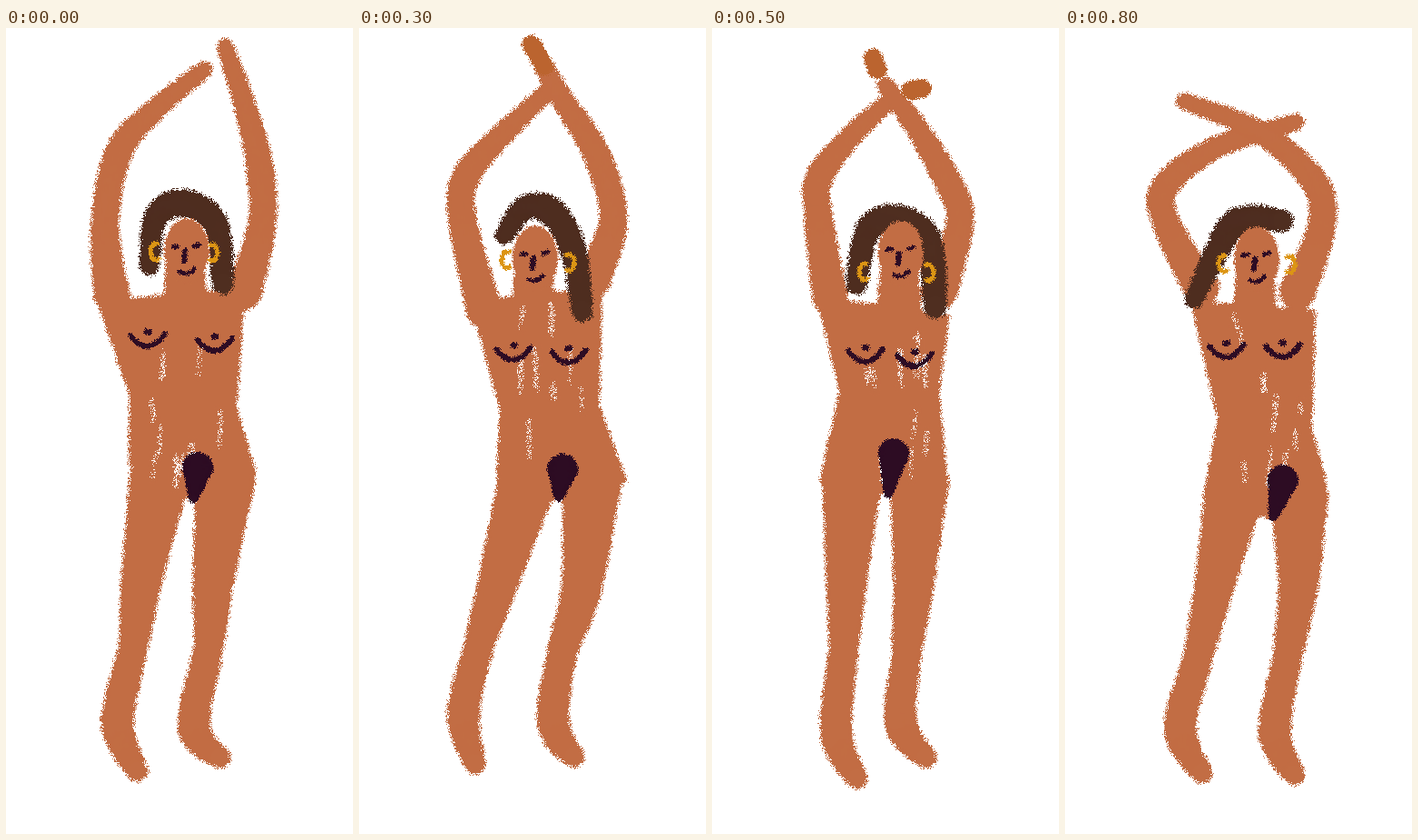
Write an HTML page with a canvas that moves like this. It is 382 by 886 pixels and loops after 900 ms.

```html
<!DOCTYPE html>
<html lang="en">
<head>
<meta charset="utf-8">
<title>Crayon dancer</title>
<style>
html, body { margin: 0; width: 100%; height: 100%; overflow: hidden; background: #fff; }
canvas { display: block; }
</style>
</head>
<body>
<canvas id="stage" width="382" height="886"></canvas>
<script>
const W = 382, H = 886, STEP = 100;
const SKIN = '#c26d44', HAIR = '#4f2e20', INK = '#2e0d24', GOLD = '#dc9514', PALM = '#bb642f';

// Joints are x y pairs: arms from shoulder to hand, legs from hip to toe.
const rise = {
  armL: [116, 292, 109, 215, 124, 137, 162, 92, 219, 45],
  armR: [262, 290, 282, 215, 279, 150, 263, 85, 241, 20],
  torso: [100, 300, 136, 405, 135, 480, 204, 520, 276, 490, 254, 415, 264, 285],
  legL: [168, 500, 149, 610, 140, 680, 123, 765, 145, 818],
  legR: [241, 500, 228, 610, 223, 680, 207, 768, 236, 803],
  hair: [158, 262, 165, 208, 195, 193, 230, 215, 239, 282], curl: [13],
  nose: [197, 250], rings: [165, 246, 227, 247], bust: [156, 338, 230, 343],
  patch: [211, 483, 206, 518], palms: []
};
const sway = {
  armL: [132, 285, 113, 210, 118, 170, 190, 110, 290, 73],
  armR: [238, 290, 282, 230, 278, 180, 226, 102, 166, 42],
  torso: [118, 290, 152, 405, 186, 480, 258, 508, 324, 490, 275, 375, 248, 305],
  legL: [216, 510, 184, 610, 151, 690, 121, 775, 130, 828],
  legR: [290, 490, 264, 600, 228, 690, 200, 770, 226, 812],
  hair: [115, 282, 142, 228, 180, 202, 232, 203, 243, 248], curl: [14],
  nose: [195, 258], rings: [153, 259, 232, 261], bust: [175, 360, 221, 350],
  patch: [264, 471, 258, 502], palms: []
};
const reach = {
  armL: [138, 310, 113, 205, 120, 160, 160, 115, 212, 66],
  armR: [258, 275, 280, 210, 262, 140, 222, 75, 190, 18],
  torso: [122, 300, 155, 420, 150, 520, 216, 520, 296, 500, 265, 415, 268, 285],
  legL: [185, 500, 153, 610, 132, 680, 115, 755, 128, 810],
  legR: [256, 500, 245, 615, 223, 690, 214, 765, 237, 802],
  hair: [160, 228, 182, 198, 212, 202, 236, 245, 246, 312], curl: [13],
  nose: [192, 258], rings: [163, 255, 231, 258], bust: [170, 353, 231, 356],
  patch: [224, 485, 220, 517], palms: [190, 18, 204, 42]
};
const stand = {
  armL: [130, 295, 117, 205, 118, 165, 152, 120, 198, 78],
  armR: [250, 290, 273, 210, 255, 160, 222, 105, 190, 62],
  torso: [115, 295, 140, 400, 118, 500, 194, 512, 260, 500, 250, 400, 262, 315],
  legL: [154, 500, 148, 610, 145, 680, 137, 775, 160, 826],
  legR: [228, 500, 222, 610, 214, 690, 208, 765, 236, 803],
  hair: [159, 282, 172, 222, 205, 211, 238, 235, 246, 308], curl: [14],
  nose: [206, 253], rings: [168, 268, 238, 269], bust: [169, 355, 223, 360],
  patch: [200, 468, 194, 513], palms: [177, 33, 182, 46, 219, 69, 231, 66]
};
const lean = {
  armL: [155, 310, 122, 220, 112, 172, 150, 146, 215, 115],
  armR: [252, 370, 265, 260, 255, 160, 215, 98, 166, 40],
  torso: [140, 315, 148, 395, 98, 490, 180, 512, 238, 490, 238, 430, 255, 330],
  legL: [139, 500, 131, 610, 138, 690, 140, 775, 178, 838],
  legR: [210, 500, 208, 610, 229, 690, 255, 770, 304, 820],
  hair: [165, 222, 200, 202, 230, 208, 262, 222, 293, 212], curl: [24],
  nose: [208, 266], rings: [165, 270, 241, 274], bust: [178, 356, 225, 368],
  patch: [185, 476, 172, 508], palms: []
};
const settle = {
  armL: [150, 285, 112, 215, 110, 175, 165, 132, 256, 103],
  armR: [256, 290, 282, 220, 275, 170, 215, 115, 130, 80],
  torso: [138, 300, 168, 430, 152, 515, 224, 540, 288, 500, 272, 440, 276, 310],
  legL: [186, 515, 165, 610, 147, 690, 127, 770, 151, 820],
  legR: [257, 515, 257, 610, 245, 690, 231, 775, 253, 822],
  hair: [142, 298, 165, 250, 185, 217, 210, 209, 240, 212], curl: [13],
  nose: [209, 259], rings: [175, 259, 247, 260], bust: [178, 350, 240, 350],
  patch: [240, 497, 229, 539], palms: []
};

const ARM = [20, 15, 15, 12, 9], LEG = [33, 22, 16, 18, 11], LOCK = [0.8, 1, 1.2, 1.1, 0.9];

const between = (a, b) => Object.fromEntries(Object.keys(a).map(part =>
  [part, a[part].length === b[part].length ? a[part].map((v, i) => (v + b[part][i]) / 2) : []]));

function makeLayer() {
  const canvas = document.createElement('canvas');
  canvas.width = W;
  canvas.height = H;
  return canvas.getContext('2d', { willReadFrequently: true });
}

let seed = 7;
const random = () => (seed = (seed * 1664525 + 1013904223) >>> 0) / 2 ** 32;
const noise = Float32Array.from({ length: W * H }, () => 25 + 205 * random());
const sketch = makeLayer(), grain = makeLayer();
sketch.lineCap = sketch.lineJoin = 'round';

// Draws a smooth tube through the joints with a radius at each joint.
function limb(joints, radii) {
  const last = radii.length - 1;
  const joint = (i, axis) => joints[2 * Math.max(0, Math.min(last, i)) + axis];
  for (let s = 0; s <= last; s += 0.02) {
    const i = Math.min(last - 1, Math.floor(s)), t = s - i;
    const at = axis => {
      const [a, b, c, d] = [-1, 0, 1, 2].map(k => joint(i + k, axis));
      return b + t * (c - a + t * (2 * a - 5 * b + 4 * c - d + t * (3 * (b - c) + d - a))) / 2;
    };
    sketch.beginPath();
    sketch.arc(at(0), at(1), radii[i] + (radii[i + 1] - radii[i]) * t, 0, 7);
    sketch.fill();
  }
}

function polygon(points) {
  sketch.beginPath();
  for (let i = 0; i < points.length; i += 2) sketch.lineTo(points[i], points[i + 1]);
  sketch.fill();
}

function line(x1, y1, x2, y2, width, sag = 0) {
  sketch.lineWidth = width;
  sketch.beginPath();
  sketch.moveTo(x1, y1);
  sketch.quadraticCurveTo((x1 + x2) / 2, (y1 + y2) / 2 + sag * 2, x2, y2);
  sketch.stroke();
}

function hoop(x, y, start) {
  sketch.lineWidth = 5;
  sketch.beginPath();
  sketch.ellipse(x, y, 6, 9, 0, start, start + 4);
  sketch.stroke();
}

function breast(x, y) {
  line(x - 19, y, x + 19, y - 2, 6, 13);
  line(x - 1, y - 4, x + 1, y - 4, 7);
}

// Bare streaks where the crayon skipped the paper.
function streaks([, , left, , , , , , , , right]) {
  sketch.globalCompositeOperation = 'destination-out';
  sketch.globalAlpha = 0.55;
  for (let i = 0; i < 9; i++) {
    const x = left + 18 + (right - left - 30) * random(), y = 300 + 180 * random();
    line(x, y, x - 4 + 6 * random(), y + 12 + 35 * random(), 3 + 3 * random());
  }
  sketch.globalCompositeOperation = 'source-over';
  sketch.globalAlpha = 1;
}

// Softens a drawing, then breaks its soft edge into grains.
function crayon(target, color, softness, draw) {
  sketch.clearRect(0, 0, W, H);
  sketch.fillStyle = sketch.strokeStyle = color;
  draw();
  grain.clearRect(0, 0, W, H);
  grain.filter = `blur(${softness}px)`;
  grain.drawImage(sketch.canvas, 0, 0);
  grain.filter = 'none';
  const image = grain.getImageData(0, 0, W, H), data = image.data;
  for (let i = 0; i < noise.length; i++) data[i * 4 + 3] = data[i * 4 + 3] > noise[i] ? 255 : 0;
  grain.putImageData(image, 0, 0);
  target.drawImage(grain.canvas, 0, 0);
}

function paint(pose) {
  const page = makeLayer();
  const [x, y] = pose.nose, [earL, earLY, earR, earRY] = pose.rings;
  page.fillStyle = '#fff';
  page.fillRect(0, 0, W, H);
  crayon(page, SKIN, 2.2, () => {
    limb(pose.armL, ARM);
    limb(pose.armR, ARM);
    limb(pose.legL, LEG);
    limb(pose.legR, LEG);
    polygon(pose.torso);
    limb([x, y, x, y + 55], [20, 24]);
    streaks(pose.torso);
  });
  crayon(page, PALM, 1.8, () => {
    for (let i = 0; i < pose.palms.length; i += 4) line(...pose.palms.slice(i, i + 4), 21);
  });
  crayon(page, HAIR, 2.2, () => limb(pose.hair, LOCK.map(size => size * pose.curl[0])));
  crayon(page, SKIN, 1.6, () => {
    sketch.beginPath();
    sketch.ellipse(x + 2, y - 5, 25, 36, 0, 0, 7);
    sketch.fill();
  });
  crayon(page, GOLD, 1, () => {
    hoop(earL, earLY, 1);
    hoop(earR, earRY, -2);
  });
  crayon(page, INK, 1, () => {
    line(x - 13, y - 9, x - 8, y - 10, 5);
    line(x + 10, y - 10, x + 16, y - 12, 5);
    line(x, y - 5, x - 1, y + 6, 6);
    line(x - 6, y + 18, x + 11, y + 14, 4.5, 4);
    breast(...pose.bust.slice(0, 2));
    breast(...pose.bust.slice(2));
    limb(pose.patch, [17, 4]);
  });
  return page.canvas;
}

const drawings = [
  rise, between(rise, sway), sway,
  reach, between(reach, stand), stand,
  between(stand, lean), lean, settle
].map(paint);

const stage = document.getElementById('stage').getContext('2d');
function show() {
  stage.drawImage(drawings[Math.floor(performance.now() / STEP) % drawings.length], 0, 0);
  requestAnimationFrame(show);
}
show();
</script>
</body>
</html>
```
